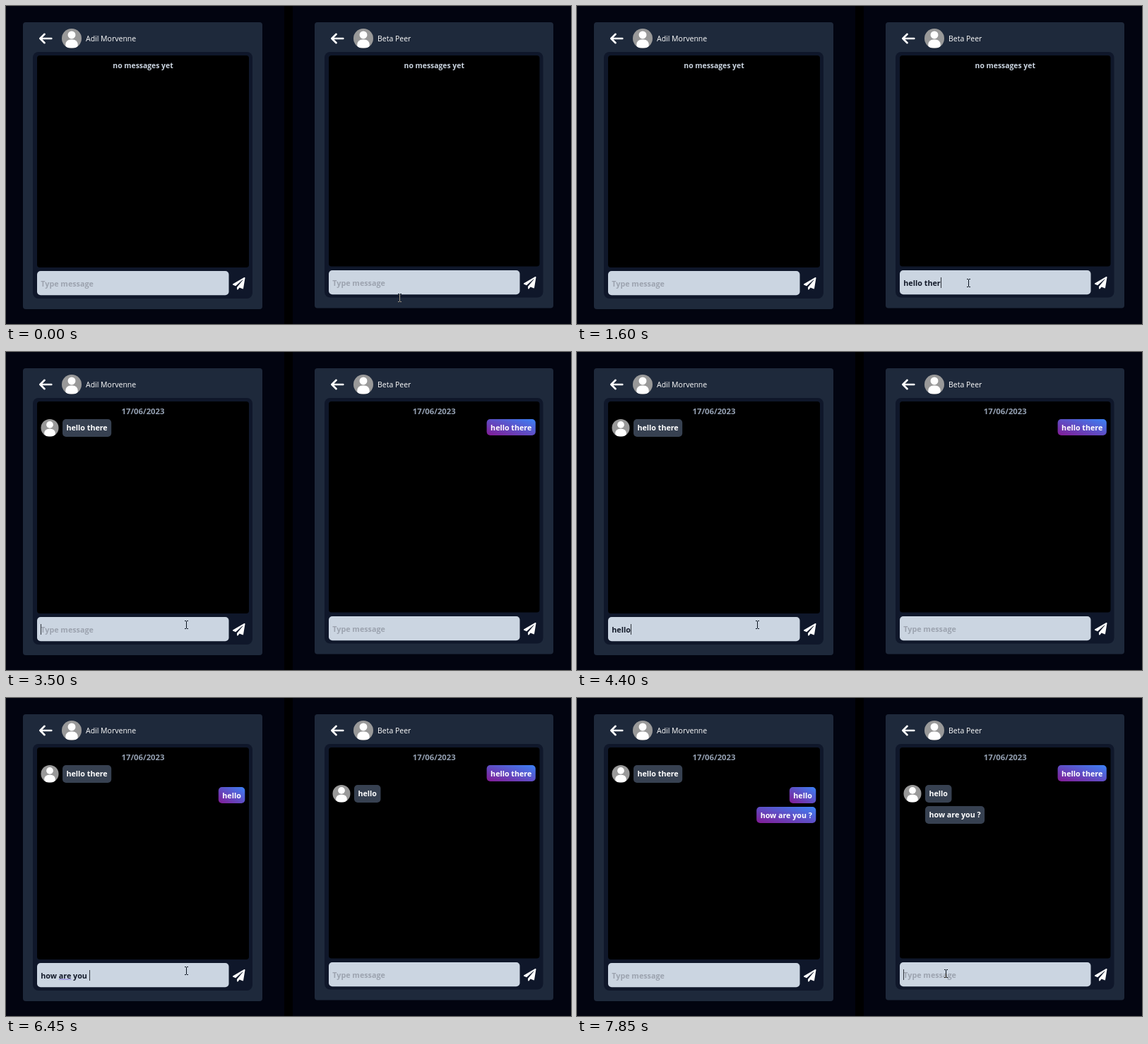
An HTML page with a canvas for the animation above (8000 ms loop, 800x450 px).

```html
<!DOCTYPE html>
<html lang="en">
<head>
<meta charset="utf-8">
<title>Chat</title>
<style>
  html, body { margin: 0; width: 100%; height: 100%; overflow: hidden; background: #020410; }
  canvas { display: block; }
</style>
</head>
<body>
<canvas id="stage" width="800" height="450"></canvas>
<script>
const ctx = document.getElementById('stage').getContext('2d');
const LOOP = 8000;
const BLINK = 530;
const FAMILY = '"Open Sans", "Noto Sans", sans-serif';
const PLANE = new Path2D('M476 3.2L12.5 270.6c-18.1 10.4-15.8 35.6 2.2 43.2L121 358.4l287.3-253.2c5.5-4.9 13.3 2.6 8.6 8.3L176 407v80.5c0 23.6 28.5 32.9 42.5 15.8L282 426l124.6 52.2c14.2 6 30.4-2.9 33-18.2l72-432C515 7.8 493.3-6.8 476 3.2z');

// Sent lines: typing start, delay per key, Enter, arrival in both chats.
const lines = [
  { text: 'hello there', from: 'right', start: 650, step: 105, enter: 1850, shown: 2900 },
  { text: 'hello', from: 'left', start: 3750, step: 130, enter: 4520, shown: 4600 },
  { text: 'how are you ?', from: 'left', start: 5300, step: 102, enter: 6620, shown: 6700 }
];

const panels = [
  { side: 'left', x: 24, name: 'Adil Morvenne', cardW: 339, cardH: 406, chat: 300, inputY: 375, inputW: 271.5,
    tops: [95, 126, 154], focus: [[3400, 7780]] },
  { side: 'right', x: 437, name: 'Beta Peer', cardW: 338, cardH: 404.5, chat: 298.5, inputY: 374, inputW: 270.5,
    tops: [95, 123, 153], focus: [[550, 3400], [7780, LOOP]] }
];

// Pointer moves: start, end, from, to, downward bulge.
const moves = [
  { a: 50, b: 320, from: [557, 413], to: [554, 392], bulge: 0 },
  { a: 2200, b: 2700, from: [554, 392], to: [479, 393], bulge: 0 },
  { a: 2900, b: 3400, from: [479, 393], to: [255, 386], bulge: 18 },
  { a: 7400, b: 7800, from: [255, 386], to: [522, 390], bulge: 10 }
];

function box(x, y, w, h, r, fill) {
  ctx.fillStyle = fill;
  ctx.beginPath();
  ctx.roundRect(x, y, w, h, r);
  ctx.fill();
}

function label(text, x, y, size, color, weight = 700, align = 'left') {
  ctx.font = `${weight} ${size}px ${FAMILY}`;
  ctx.textAlign = align;
  ctx.fillStyle = color;
  ctx.fillText(text, x, y);
}

function disc(x, y, r, fill) {
  ctx.fillStyle = fill;
  ctx.beginPath();
  ctx.arc(x, y, r, 0, Math.PI * 2);
  ctx.fill();
}

function avatar(x, y, r) {
  ctx.save();
  disc(x, y, r, '#999999');
  ctx.clip();
  disc(x, y - r * 0.36, r * 0.39, '#fff');
  box(x - r * 0.62, y + r * 0.1, r * 1.24, r * 0.82, [r * 0.5, r * 0.5, r * 0.25, r * 0.25], '#fff');
  ctx.restore();
}

function backArrow(x, y) {
  ctx.strokeStyle = '#fff';
  ctx.lineWidth = 2.6;
  ctx.lineCap = ctx.lineJoin = 'round';
  ctx.beginPath();
  ctx.moveTo(x + 16, y);
  ctx.lineTo(x, y);
  ctx.moveTo(x + 6.3, y - 6.2);
  ctx.lineTo(x, y);
  ctx.lineTo(x + 6.3, y + 6.2);
  ctx.stroke();
}

function sendIcon(x, y) {
  ctx.save();
  ctx.translate(x, y);
  ctx.scale(17.5 / 512, 17.5 / 512);
  ctx.fillStyle = '#fff';
  ctx.fill(PLANE);
  ctx.restore();
}

// Corner-to-corner gradient, bottom left to top right.
function sentFill(x, y, w, h) {
  const k = w * h / (w * w + h * h);
  const cx = x + w / 2, cy = y + h / 2;
  const g = ctx.createLinearGradient(cx - h * k, cy + w * k, cx + h * k, cy - w * k);
  g.addColorStop(0, '#831a94');
  g.addColorStop(1, '#3b82f6');
  return g;
}

function bubble(p, line, y) {
  const size = 10.7;
  ctx.font = `700 ${size}px ${FAMILY}`;
  const w = ctx.measureText(line.text).width + 11;
  const sent = line.from === p.side;
  const h = sent ? 23 : 25;
  const x = sent ? p.x + 20 + p.chat - 5.7 - w : p.x + 56;
  box(x, y, w, h, 5, sent ? sentFill(x, y, w, h) : '#374151');
  label(line.text, x + 5.5, y + (sent ? 15.5 : 16), size, '#fff');
}

function messages(p, t) {
  const mid = p.x + 20 + p.chat / 2;
  if (t < lines[0].shown) {
    label('no messages yet', mid, 88, 10.4, '#cbd5e1', 700, 'center');
    return;
  }
  label('17/06/2023', mid, 88, 11.3, '#94a0b2', 700, 'center');
  let hasAvatar = false;
  lines.forEach((line, i) => {
    if (t < line.shown) return;
    bubble(p, line, p.tops[i]);
    if (line.from !== p.side && !hasAvatar) {
      avatar(p.x + 38, p.tops[i] + 12.4, 12.5);
      hasAvatar = true;
    }
  });
}

function typedText(side, t) {
  const line = lines.find(l => l.from === side && t >= l.start && t < l.enter);
  return line ? line.text.slice(0, Math.floor((t - line.start) / line.step) + 1) : '';
}

function caretOn(p, t) {
  const span = p.focus.find(([a, b]) => t >= a && t < b);
  if (!span) return false;
  let reset = span[0];
  for (const l of lines) {
    if (l.from !== p.side) continue;
    const lastKey = l.start + (l.text.length - 1) * l.step;
    if (t >= l.start && t < lastKey) return true;
    for (const key of [lastKey, l.enter]) if (t >= key) reset = Math.max(reset, key);
  }
  return Math.floor((t - reset) / BLINK) % 2 === 0;
}

function inputBar(p, t) {
  const x = p.x + 20, y = p.inputY, textX = x + 5.3;
  box(x, y, p.inputW, 34.3, 5, '#cbd5e1');
  const text = typedText(p.side, t);
  label(text || 'Type message', textX, y + 21.6, 10.75, text ? '#111827' : '#9ca3af');
  const width = s => ctx.measureText(s).width;
  if (text.startsWith('how are you')) {
    ctx.fillStyle = '#8577dc';
    ctx.fillRect(textX + width('how '), y + 22.6, width('are'), 1);
  }
  if (caretOn(p, t)) {
    ctx.fillStyle = '#30343c';
    ctx.fillRect(Math.round(textX + width(text)), y + 10, 1, 15);
  }
  sendIcon(p.x + 297 - (p.side === 'right' ? 1 : 0), y + 9);
}

function panel(p, t) {
  box(p.x, 23, p.cardW, p.cardH, 4, '#1e293b');
  box(p.x + 14, 65, p.chat + 11, p.chat + 49, 8, '#0f172a');
  box(p.x + 20, 70, p.chat, p.chat, 4, '#000');
  backArrow(p.x + 24.3, 46);
  avatar(p.x + 69, 46, 14);
  label(p.name, p.x + 89, 50, 10.5, '#fff', 400);
  messages(p, t);
  inputBar(p, t);
}

function pointerAt(t) {
  let pos = moves[0].from;
  for (const { a, b, from, to, bulge } of moves) {
    if (t < a) break;
    const u = Math.min(1, (t - a) / (b - a));
    const e = u * u * (3 - 2 * u);
    pos = [from[0] + (to[0] - from[0]) * e,
           from[1] + (to[1] - from[1]) * e + bulge * Math.sin(Math.PI * e)];
  }
  return pos.map(Math.round);
}

// Inverting I-beam: light on dark areas, dark on the input.
function pointer([x, y]) {
  ctx.save();
  ctx.globalCompositeOperation = 'difference';
  ctx.fillStyle = '#c0c0c0';
  ctx.fillRect(x, y - 5, 1, 10);
  for (const dy of [-6, 5]) {
    ctx.fillRect(x - 2, y + dy, 2, 1);
    ctx.fillRect(x + 1, y + dy, 2, 1);
  }
  ctx.restore();
}

function draw(t) {
  ctx.fillStyle = '#020410';
  ctx.fillRect(0, 0, 800, 450);
  ctx.fillStyle = '#000';
  ctx.fillRect(394, 0, 12, 450);
  panels.forEach(p => panel(p, t));
  pointer(pointerAt(t));
}

const began = performance.now();
function tick() {
  draw((performance.now() - began) % LOOP);
  requestAnimationFrame(tick);
}
tick();
</script>
</body>
</html>
```
